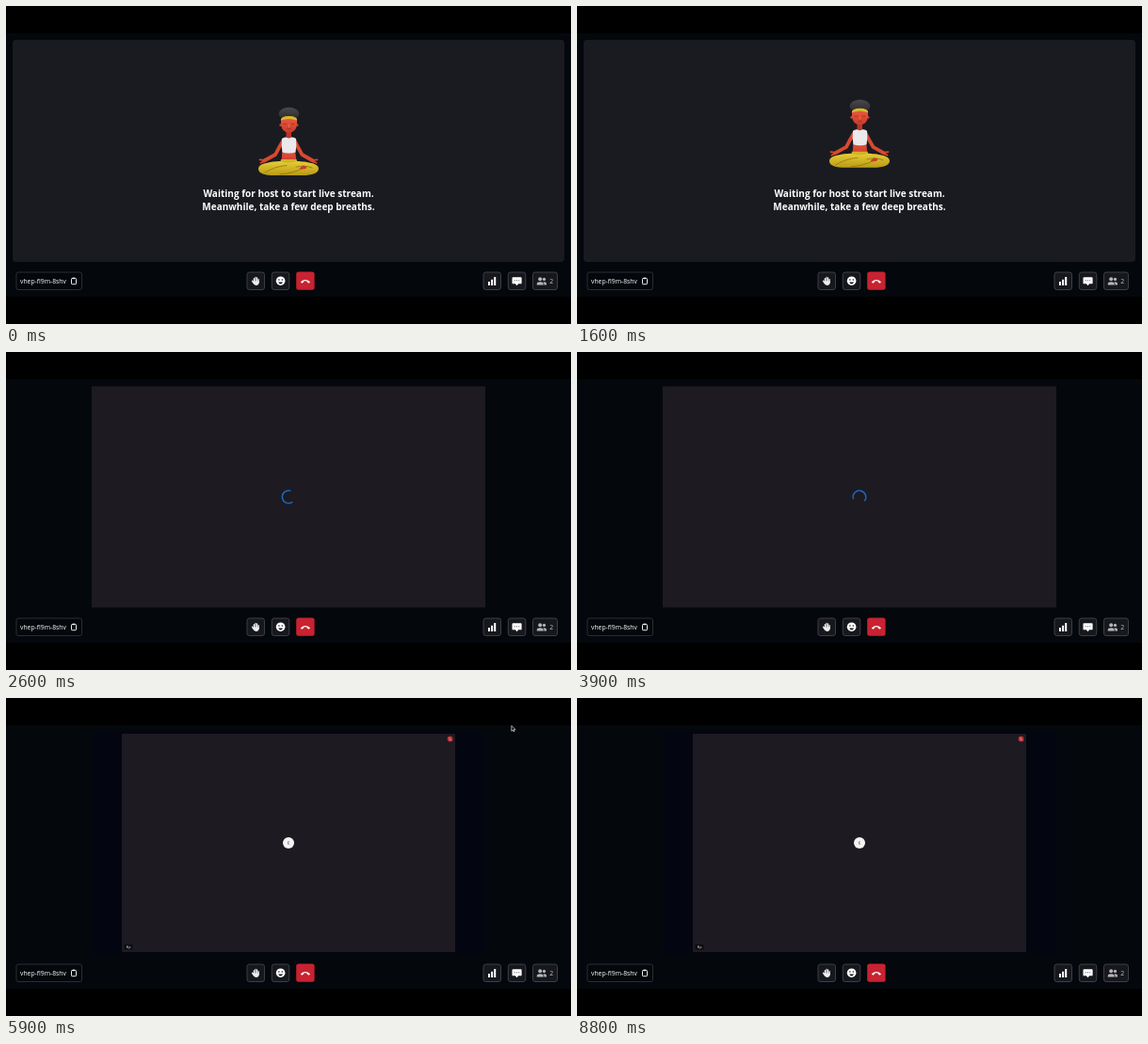
Recreate the animation shown at these times as an HTML page. Size 600 px wide and 338 px high, loop 8900 ms.

```html
<!DOCTYPE html>
<html lang="en">
<head>
<meta charset="utf-8">
<title>Live stream waiting room</title>
<style>
  html, body { margin: 0; width: 100%; height: 100%; overflow: hidden; background: #000; }
  svg { display: block; width: 100%; height: 100%; }
  text { font-family: "Open Sans", "Noto Sans", sans-serif; fill: #fff; }
  .message { font-size: 10px; font-weight: 700; text-anchor: middle; }
  .button { fill: #17181d; stroke: #43444a; stroke-width: .9; }
  .line { fill: none; stroke-linecap: round; stroke-linejoin: round; }
</style>
</head>
<body>
<svg viewBox="0 0 600 338">
  <defs>
    <linearGradient id="skin" x2="0" y2="1">
      <stop stop-color="#e8573c"/><stop offset="1" stop-color="#c93a2c"/>
    </linearGradient>
    <linearGradient id="cloth" x2="0" y2="1">
      <stop stop-color="#e6cc35"/><stop offset="1" stop-color="#b99a16"/>
    </linearGradient>
    <linearGradient id="hair" x2="0" y2="1">
      <stop stop-color="#4a484b"/><stop offset="1" stop-color="#28272a"/>
    </linearGradient>
  </defs>

  <rect y="29" width="600" height="280" fill="#04080c"/>

  <g id="waiting">
    <rect x="7" y="36" width="586" height="236" rx="4" fill="#1a1b21"/>
    <g id="yogi">
      <path d="M297.5 131h5.500v10h-5.500z" fill="#b93528"/>
      <path d="M293.500 153h13.500l1.500 13h-16z" fill="url(#skin)"/>
      <g class="line" stroke="#d8492f" stroke-width="3.800">
        <path d="M294 143.500Q289 152 286 158L274 164.500"/>
        <path d="M306.500 143.500Q311 152 314.500 158L326 164.500"/>
      </g>
      <g class="line" stroke="#d8492f" stroke-width="1.700">
        <path d="M275 164l-5.500-.700M274 165l-3.500 1.800"/>
        <path d="M325 164l5.500-.700M326 165l3.500 1.800"/>
      </g>
      <path d="M293 141q2.500-2 4.500-1.500 3 2 5.500 0 3-.500 5 1.500 1 7-.500 14.500-7 1.800-14 0-1.500-8-.500-14.500z" fill="#ebe9ec"/>
      <path d="M292 163h16.500l2 6h-20z" fill="#d1b327"/>
      <path d="M291 165c-10 .500-22 2-23 7.500-.500 6 8 7.500 17 7.500h30c10 0 17-2 17-7.500-.500-5.500-13-7-23-7.500-6 2-12 2-18 0z" fill="url(#cloth)"/>
      <g class="line" stroke="#8f7510" stroke-width=".8">
        <path d="M275 177q10-6.500 23-7.500M291 179q14-1 24-6.500M308 171q10-2 17 1"/>
      </g>
      <path d="M311.500 172.500l4-3 4 1-1 2.500-5 .800z" fill="#c8402c"/>
      <ellipse cx="300.500" cy="114.600" rx="10.800" ry="6.800" fill="url(#hair)"/>
      <circle cx="291.800" cy="126.500" r="1.500" fill="#c53d2d"/>
      <circle cx="309" cy="126.500" r="1.500" fill="#c53d2d"/>
      <path d="M292 120h17v6q-1 8.500-8.500 8.500t-8.500-8.500z" fill="url(#skin)"/>
      <path d="M291.800 121.500q0-4.500 8.700-4.500t8.700 4.500q-8.700-3-17.400 0z" fill="#d9b92d"/>
      <g class="line" stroke="#8e2a22" stroke-width=".7">
        <path d="M294.800 125.300q1.500 1 3 0M303 125.300q1.500 1 3 0M298.800 130.500q1.700 1 3.400 0"/>
      </g>
      <path d="M300.400 126v2.500" class="line" stroke="#ee7253"/>
    </g>
    <text class="message" x="300" y="203">Waiting for host to start live stream.</text>
    <text class="message" x="300" y="217">Meanwhile, take a few deep breaths.</text>
  </g>

  <g id="loading">
    <rect x="91" y="36.500" width="418" height="235" fill="#1d1a22"/>
    <path id="spinner" class="line" d="M293.400 155.900A6.800 6.800 0 1 1 305.700 157.800" stroke="#1d66b8" stroke-width="1.500"/>
  </g>

  <rect id="stage" x="91" y="36" width="418" height="236" fill="#030610"/>

  <g id="guest">
    <rect x="123" y="38" width="354" height="232" rx="1" fill="#1d1a22"/>
    <circle cx="300" cy="154" r="6" fill="#f4f4f5"/>
    <text x="300" y="155.600" text-anchor="middle" style="font-size:4.500px;fill:#55555a">K</text>
    <rect x="125.500" y="262" width="9" height="5.300" rx=".6" fill="#0c0b10"/>
    <text x="130" y="265.800" text-anchor="middle" style="font-size:3.200px">Kip</text>
    <circle cx="471.600" cy="43.500" r="3" fill="#b92c2c"/>
    <path d="M471.600 42v1.700M470.300 44.300q1.300 1.300 2.600 0M470 42l3.200 3.200" class="line" stroke="#e5a09b" stroke-width=".5"/>
  </g>

  <g id="toolbar">
    <rect x="11" y="283" width="69.500" height="18.500" rx="2" fill="#04070b" stroke="#303238" stroke-width=".9"/>
    <text x="15" y="294.600" font-size="6.800">vhep-fl9m-8shv</text>
    <rect x="69.500" y="289.500" width="5" height="6.200" rx=".8" class="line" stroke="#eee" stroke-width="1"/>
    <path d="M70.700 288.600h2.600v1.600h-2.600z" fill="#eee"/>

    <g class="button">
      <rect x="256" y="283" width="18.500" height="18.500" rx="2.500"/>
      <rect x="282.300" y="283" width="18.500" height="18.500" rx="2.500"/>
      <rect x="507" y="283" width="18.500" height="18.500" rx="2.500"/>
      <rect x="533.300" y="283" width="18.500" height="18.500" rx="2.500"/>
      <rect x="559.500" y="283" width="26" height="18.500" rx="2.500"/>
    </g>
    <rect x="308.200" y="282.600" width="19.400" height="19.200" rx="2.500" fill="#c92231"/>

    <g class="line" stroke="#eee" stroke-width="1.300">
      <path d="M263.400 293v-3.300M265 293v-4.500M266.600 293v-4.100M268.200 293.500v-2.800M262.500 293.800l-1-1.600"/>
    </g>
    <path d="M262 292.500h6.800v1.500q-.5 3-3.300 3-2.200 0-3.500-3z" fill="#eee"/>

    <circle cx="291.600" cy="292.200" r="4.800" fill="#fff"/>
    <circle cx="289.900" cy="291" r=".8" fill="#17181d"/>
    <circle cx="293.300" cy="291" r=".8" fill="#17181d"/>
    <path d="M289.200 293.600h4.800q-.8 1.900-2.400 1.900t-2.400-1.900z" fill="#17181d"/>

    <path d="M312.800 293.200q5.100-4.600 10.200 0l-1.300 1.500-2-1.100v-1.100q-1.800-.6-3.600 0v1.100l-2 1.100z" fill="#fff"/>

    <path d="M512 293h2v4h-2zM515.100 290.700h2v6.300h-2zM518.200 288h2v9h-2z" fill="#fff"/>

    <path d="M538.400 288.300h8.300q.9 0 .9.900v5.200q0 .9-.9.900h-2.600l-1.600 2-1.600-2h-2.500q-.9 0-.9-.9v-5.200q0-.9.900-.9z" fill="#fff"/>
    <path d="M540.300 291.700h.01M542.500 291.700h.01M544.700 291.700h.01" class="line" stroke="#33343a" stroke-width="1.100"/>

    <g fill="#b4b5b9">
      <circle cx="567.200" cy="290.200" r="2"/>
      <path d="M563.700 296.600v-.9q0-2.400 3.500-2.400t3.500 2.400v.9z"/>
      <circle cx="571.500" cy="290.400" r="1.600"/>
      <path d="M571.400 296.600v-1q0-1.400-.9-2.200 3.500-.3 3.500 2.200v1z"/>
    </g>
    <text x="577.300" y="294.700" style="font-size:6.800px;fill:#c4c5c9">2</text>
  </g>

  <path id="cursor" d="M536.800 29.400v5.800l1.400-1.200.9 1.800 1-.5-.9-1.700h1.900z" fill="#111" stroke="#ddd" stroke-width=".7"/>
</svg>
<script>
  const LOOP = 8900;
  const $ = id => document.getElementById(id);

  // Visible interval of each part, in ms
  const spans = {
    waiting: [0, 2000],
    loading: [2600, 4800],
    spinner: [2600, 4600],
    stage: [4800, LOOP],
    cursor: [5000, 7100],
    guest: [5900, LOOP]
  };

  function draw() {
    const t = performance.now() % LOOP;
    for (const [id, [from, to]] of Object.entries(spans)) {
      $(id).style.display = t >= from && t < to ? "" : "none";
    }
    const rise = 3.2 * (t / 1000) ** 2;
    $("yogi").setAttribute("transform", `translate(0 ${-rise})`);
    const angle = (t - 3900) * 0.36;
    $("spinner").setAttribute("transform", `rotate(${angle} 300 154)`);
    requestAnimationFrame(draw);
  }
  draw();
</script>
</body>
</html>
```
